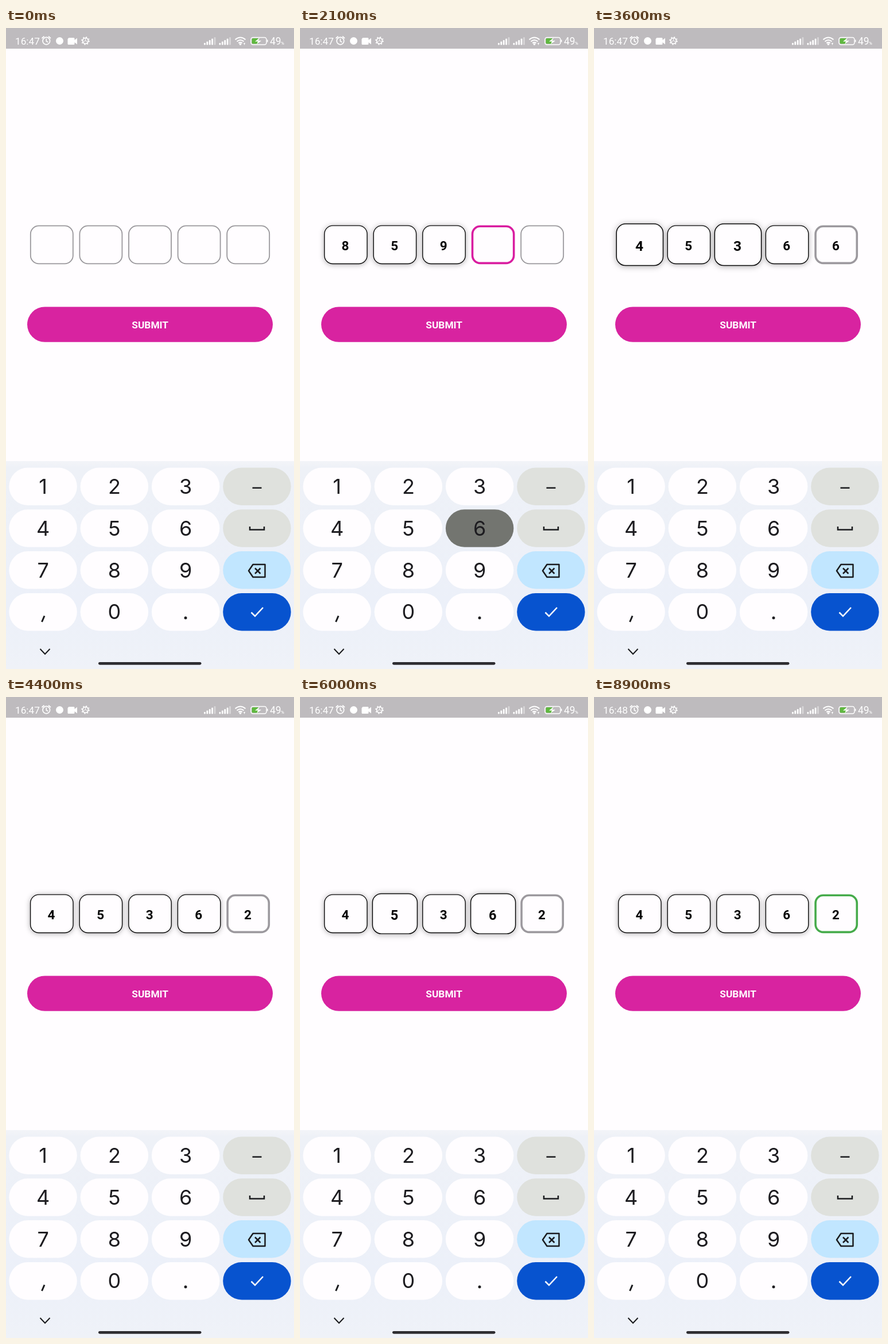
Animation, 502 px wide and 1116 px high, one loop 9 s. Source, as an HTML page:

```html
<!DOCTYPE html>
<html lang="en">
<head>
<meta charset="utf-8">
<title>Code entry</title>
<style>
  html, body { margin: 0; width: 100%; height: 100%; overflow: hidden; background: #fffdff; }
  svg { display: block; width: 502px; height: 1116px; }
  text { font-family: Roboto, sans-serif; }
  .key { font: 36px Inter, sans-serif; fill: #1d1c20; text-anchor: middle; }
  .cell { font-size: 22.5px; font-weight: 700; fill: #050505; text-anchor: middle; }
  .line { fill: none; stroke: #1b1c1f; stroke-width: 2.5; }
  .status { fill: none; stroke: #fff; stroke-width: 1.7; }
</style>
</head>
<body>
<svg viewBox="0 0 502 1116">
  <defs>
    <linearGradient id="board" x2="0" y2="1">
      <stop stop-color="#f3f4f8"/><stop offset=".03" stop-color="#eef1f7"/>
      <stop offset=".7" stop-color="#ecf0f9"/><stop offset="1" stop-color="#eff2f8"/>
    </linearGradient>
  </defs>
  <rect width="502" height="1116" fill="#fffdff"/>
  <rect width="502" height="36" fill="#bebbbe"/>

  <g fill="#fff">
    <text id="clock" x="16" y="29.3" font-size="17.2">16:47</text>
    <text x="460" y="29.3" font-size="17.5">49</text>
    <text x="479" y="29.3" font-size="8" font-weight="500">%</text>
    <circle cx="93.5" cy="22.5" r="6.5"/>
    <path d="M109 17h9q1.500 0 1.500 1.500v2.500l4.500-3.500v11l-4.500-3.500v2.500q0 1.500-1.500 1.500h-9q-1.500 0-1.500-1.500v-8q0-1.500 1.500-1.500z"/>
    <g id="signal"></g>
    <circle cx="408.5" cy="28.3" r="1.8"/>
    <path d="M414 26l1.500 4 1.500-4z"/>
    <path d="M455 20.500h1.500v4h-1.500z"/>
  </g>
  <g class="status">
    <circle cx="70.3" cy="22.5" r="6.3"/>
    <path d="M70.300 18.500v4.500l3 1.700M62.500 18l4-3.500M78 18l-4-3.500"/>
    <circle cx="138.5" cy="22.3" r="5"/>
    <circle cx="138.5" cy="22.3" r="6.5" stroke-dasharray="2 3.1"/>
    <path d="M138.500 18v4l3.500 2m-3.500-2l-3.500 2" stroke-width="1"/>
    <path d="M399.500 20.300q9-7.500 18 0M402.500 23.500q6-5 12 0M405.300 26.400q3.200-2.500 6.400 0" stroke-width="2"/>
    <rect x="427" y="16.5" width="27" height="12.5" rx="3.5" stroke-width="1.5"/>
  </g>
  <rect x="428.5" y="18" width="12" height="9.5" rx="2" fill="#5fb83f"/>
  <path d="M442 17l-8 6.500h5l-2 5 8-6.500h-5z" fill="#fff"/>

  <g id="cells"></g>

  <rect x="37" y="485.5" width="428" height="61.3" rx="30.65" fill="#d823a0"/>
  <rect id="press" x="37" y="485.5" width="428" height="61.3" rx="30.65" fill="#fff" opacity="0"/>
  <text x="251.2" y="522.7" font-size="17.3" font-weight="700" fill="#fff" text-anchor="middle">SUBMIT</text>

  <rect y="754" width="502" height="362" fill="url(#board)"/>
  <g id="keys"></g>
  <path d="M429.500 800.700h16" class="line"/>
  <path d="M425 868v5.500h25v-5.500" class="line"/>
  <path d="M430.500 934h21v22h-21l-7.500-11z" class="line" stroke-linejoin="round"/>
  <path d="M434 940.500l9.500 9.500m0-9.500l-9.500 9.500" class="line"/>
  <path d="M427.500 1017.500l6.500 6.500 14-15" class="line" style="stroke:#fff"/>
  <path d="M67 1023.500l-4.500 10.500" class="line" style="stroke-width:3"/>
  <circle cx="313" cy="1027" r="2.5" fill="#1d1c20"/>
  <path d="M59.500 1081l8.500 9 8.500-9" class="line" style="stroke-width:2"/>
  <rect x="161" y="1104" width="179.5" height="4.7" rx="2.35" fill="#2e2d31"/>
</svg>
<script>
const LOOP = 9000, POP = 250;
const $ = id => document.getElementById(id);

function set(el, attrs) {
  for (const name in attrs) el.setAttribute(name, attrs[name]);
}

function add(parent, tag, attrs, text = '') {
  const el = document.createElementNS('http://www.w3.org/2000/svg', tag);
  set(el, attrs);
  el.textContent = text;
  parent.append(el);
  return el;
}

for (const x of [345, 371.5])
  for (let i = 0; i < 5; i++) {
    const h = 3.5 + i * 2.5;
    add($('signal'), 'rect', { x: x + i * 4.4, y: 29.5 - h, width: 2.8, height: h, rx: 1, opacity: i < 4 ? 1 : .4 });
  }

const keys = {};
const sideColors = ['#dfe1dd', '#dfe1dd', '#c1e6ff', '#0753cf'];
['123-', '456_', '789<', ',0.>'].forEach((row, r) => [...row].forEach((label, c) => {
  const x = 5.3 + c * 124.3, y = 765.5 + r * 72.8;
  keys[label] = add($('keys'), 'rect', {
    x, y, width: 118.5, height: 65.5, rx: 32.75, fill: c < 3 ? '#fffdff' : sideColors[r]
  });
  if (/\d/.test(label))
    add($('keys'), 'text', { class: 'key', x: x + 59.3, y: y + 45.5 }, label);
}));

const cells = [0, 1, 2, 3, 4].map(i => {
  const group = add($('cells'), 'g', {});
  return {
    group, cx: 79.8 + i * 85.6,
    box: add(group, 'rect', { fill: '#fffdff' }),
    label: add(group, 'text', { class: 'cell', x: -.8, y: 9.9 })
  };
});

const typed = [1100, 1250, 1700, 2200, 2600];
const first = '85966', last = '45362';
const presses = [['8', 1000, 1100], ['5', 1200, 1300], ['9', 1400, 1500], ['6', 2100, 2200], ['6', 2400, 2500]];
const waves = [3475, 4525, 5525];
const waveDelay = [0, 270, 0, 270, 540];
const submitted = 3100, verified = 6400;

const bump = (t, start, length) =>
  t > start && t < start + length ? Math.sin(Math.PI * (t - start) / length) : 0;

function drawCell(cell, i, t) {
  const filled = t >= typed[i];
  const focused = t >= (i ? typed[i - 1] : 500) && (i === 4 || !filled);
  const done = filled && !focused;
  let color = '#99979b', width = 1.8;
  if (focused) {
    color = t >= verified ? '#46ab4b' : t >= submitted ? '#9c999e' : '#d91da0';
    width = 3.6;
  } else if (done) {
    color = '#080808';
    width = 1.4;
  }
  // The outer edge stays put; thicker borders grow inwards.
  const w = 75.8 - width, h = 67.8 - width;
  set(cell.box, {
    x: -w / 2, y: -h / 2, width: w, height: h, rx: 15.3 - width / 2,
    stroke: color, 'stroke-width': width
  });
  cell.box.style.filter = done ? 'drop-shadow(0 1px 5px rgba(0,0,0,.32))' : 'none';

  const pops = waves.map(start => bump(t, start + waveDelay[i], POP));
  if (i < 4) pops.push(bump(t, typed[i], POP));
  set(cell.group, { transform: `translate(${cell.cx} 377.3) scale(${1 + .093 * Math.max(...pops)})` });
  const changed = t >= waves[0] + waveDelay[i];
  cell.label.textContent = filled ? (changed ? last : first)[i] : '';
}

function draw(t) {
  cells.forEach((cell, i) => drawCell(cell, i, t));
  for (const label of '5689') {
    const down = presses.some(([key, from, to]) => key === label && t >= from && t < to);
    set(keys[label], { fill: down ? '#737570' : '#fffdff' });
  }
  set($('press'), { opacity: .15 * bump(t, 2900, 450) });
  $('clock').textContent = t < 8400 ? '16:47' : '16:48';
}

const begin = performance.now();
function frame() {
  draw((performance.now() - begin) % LOOP);
  requestAnimationFrame(frame);
}
frame();
</script>
</body>
</html>
```
